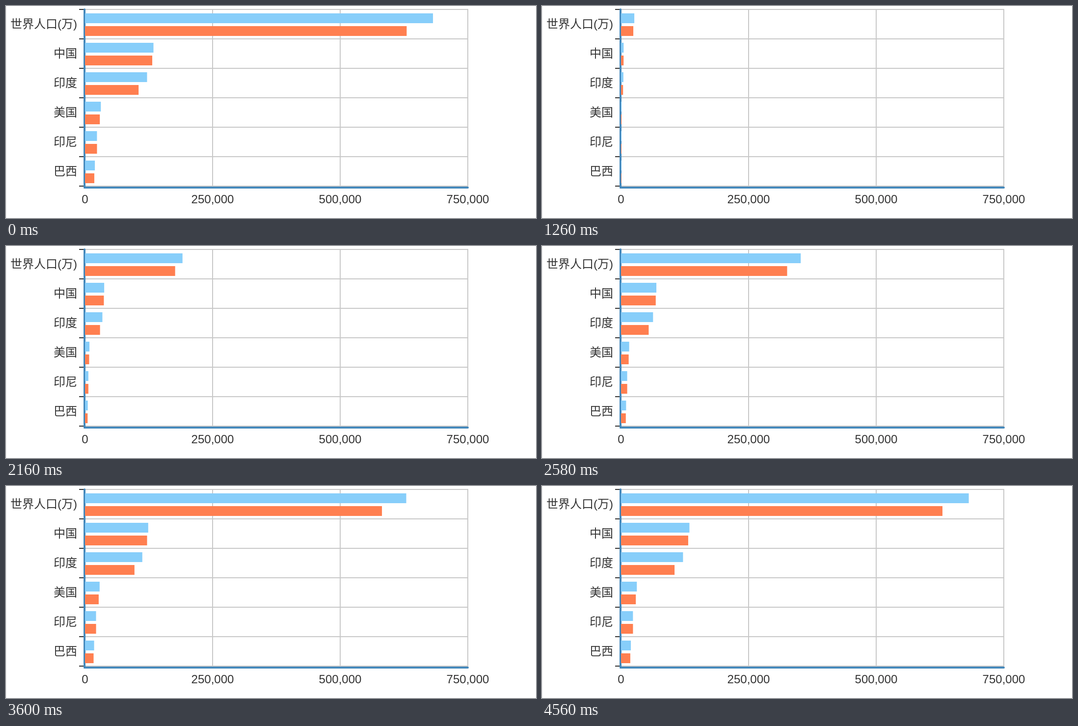
These frames come from a looping animation (1080 px wide and 432 px high, 4.62 s). An HTML page with a canvas:

```html
<!DOCTYPE html>
<html lang="zh-CN">
<head>
<meta charset="utf-8">
<title>人口条形图</title>
<style>
  html, body { margin: 0; width: 100%; height: 100%; overflow: hidden; background: #fff; }
  canvas { display: block; width: 1080px; height: 432px; }
</style>
</head>
<body>
<canvas id="stage" width="1080" height="432"></canvas>
<script>
const ctx = document.getElementById('stage').getContext('2d');

const LOOP = 4620, STEP = 60, HOLD = 360;
const GROW_START = 305, GROW_TIME = 4500;
const LEFT = 161, TOP = 7, ROW = 60, COLUMN = 260;
const PIXELS_PER_UNIT = COLUMN / 250000;

const rows = [
  ['世界人口(万)', 681807, 630230],
  ['中国', 134141, 131744],
  ['印度', 121594, 104970],
  ['美国', 31034, 29034],
  ['印尼', 23438, 23489],
  ['巴西', 19325, 18203]
];
const ticks = ['0', '250,000', '500,000', '750,000'];
const right = LEFT + COLUMN * (ticks.length - 1);
const bottom = TOP + ROW * rows.length;

function line(x1, y1, x2, y2, color, width, cap = 'butt') {
  ctx.strokeStyle = color;
  ctx.lineWidth = width;
  ctx.lineCap = cap;
  ctx.beginPath();
  ctx.moveTo(x1, y1);
  ctx.lineTo(x2, y2);
  ctx.stroke();
}

function bar(y, value, color, growth) {
  ctx.fillStyle = color;
  ctx.fillRect(LEFT, y, value * PIXELS_PER_UNIT * growth, 20);
}

function drawGrid() {
  line(0.5, 0, 0.5, 432, '#f0f0f0', 1);
  ticks.forEach((_, i) => {
    const x = LEFT + i * COLUMN;
    line(x, TOP - 1, x, bottom + 1, '#c8c8c8', 2);
  });
  for (let i = 0; i <= rows.length; i++) {
    const y = TOP + i * ROW;
    line(LEFT, y, right + 1, y, '#c8c8c8', 2);
    line(149, y, 159, y, '#333', 2);
  }
  line(160, TOP, 160, bottom + 3, '#4488bb', 4, 'round');
  line(160, bottom + 3, right, bottom + 3, '#4488bb', 4, 'round');
}

function drawLabels() {
  ctx.fillStyle = '#333';
  ctx.font = '24px "Liberation Sans", Arial, "Noto Sans CJK SC", "Noto Sans CJK", sans-serif';
  ctx.textBaseline = 'alphabetic';
  ctx.textAlign = 'right';
  rows.forEach(([name], i) => ctx.fillText(name, 145, 45 + i * ROW));
  ctx.textAlign = 'center';
  ticks.forEach((label, i) => ctx.fillText(label, LEFT + i * COLUMN, 402));
}

function easeInOutCubic(p) {
  return p < 0.5 ? 4 * p ** 3 : 1 - 4 * (1 - p) ** 3;
}

function growthAt(time) {
  return time < HOLD ? 1 : easeInOutCubic((time - GROW_START) / GROW_TIME);
}

function draw(time) {
  const growth = growthAt(time);
  ctx.fillStyle = '#fff';
  ctx.fillRect(0, 0, 1080, 432);
  drawGrid();
  rows.forEach(([, upper, lower], i) => {
    bar(15 + i * ROW, upper, '#87cefa', growth);
    bar(41 + i * ROW, lower, '#ff7f50', growth);
  });
  drawLabels();
}

const start = performance.now();
function tick() {
  const elapsed = (performance.now() - start) % LOOP;
  draw(Math.floor(elapsed / STEP) * STEP);
  requestAnimationFrame(tick);
}
tick();
</script>
</body>
</html>
```
